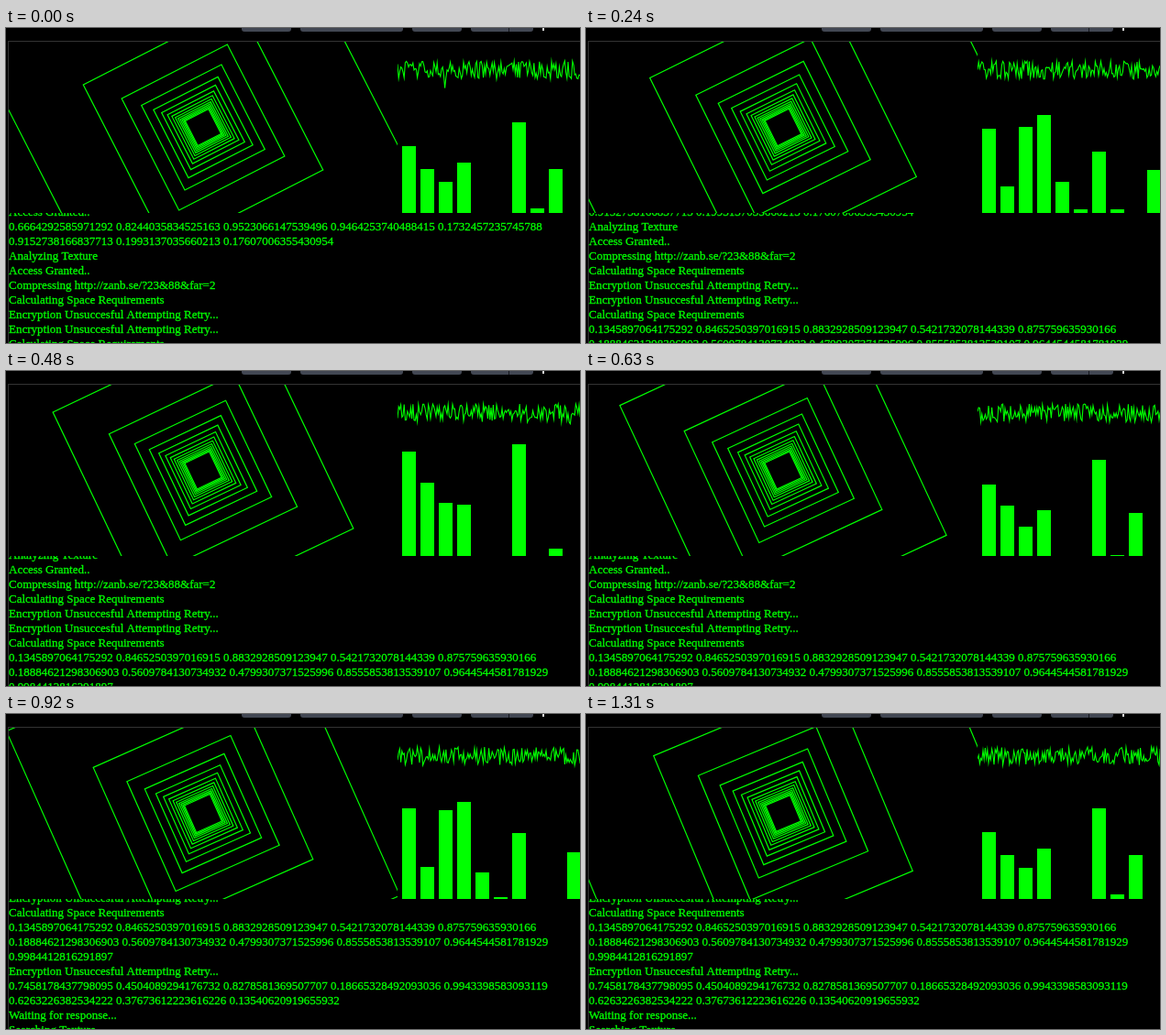
An HTML page with a canvas that plays this animation: 626 px wide and 344 px high, repeating every 1.41 s.

```html
<!DOCTYPE html>
<html lang="en">
<head>
<meta charset="utf-8">
<title>Terminal</title>
<style>
html, body { margin: 0; width: 100%; height: 100%; overflow: hidden; background: #000; }
canvas { display: block; }
</style>
</head>
<body>
<canvas id="stage" width="626" height="344"></canvas>
<script>
const ctx = document.getElementById("stage").getContext("2d");
const W = 626, H = 344, LOOP = 1410;
const GREEN = "#00ff00";

// The picture holds between these times (ms).
const STEPS = [0, 120, 240, 360, 480, 630, 800, 920, 1040, 1160, 1310];

const RETRY = "Encryption Unsuccesful Attempting Retry...";
const SPACE = "Calculating Space Requirements";
const LOG = [
  "Access Granted..",
  "0.6664292585971292 0.8244035834525163 0.9523066147539496 0.9464253740488415 0.1732457235745788",
  "0.9152738166837713 0.1993137035660213 0.17607006355430954",
  "Analyzing Texture",
  "Access Granted..",
  "Compressing http://zanb.se/?23&88&far=2",
  SPACE,
  RETRY,
  RETRY,
  SPACE,
  "0.1345897064175292 0.8465250397016915 0.8832928509123947 0.5421732078144339 0.875759635930166",
  "0.18884621298306903 0.5609784130734932 0.4799307371525996 0.8555853813539107 0.9644544581781929",
  "0.9984412816291897",
  RETRY,
  "0.7458178437798095 0.4504089294176732 0.8278581369507707 0.18665328492093036 0.9943398583093119",
  "0.6263226382534222 0.37673612223616226 0.13540620919655932",
  "Waiting for response...",
  "Searching Texture"
];

// Each bar swings as a cosine: middle height, swing, phase of its peak.
const PULSE = 655;
const BARS = [
  [93, 28, 0.62], [50, 30, 0.74], [65, 33, 0.45], [76, 31, 0.37], [-2, 38, 0.31],
  [-24, 29, 0.33], [93, 30, 0.78], [-3, 18, 0.18], [12, 36, 0], [9, 43, 0.44]
];

const clamp = (v, lo, hi) => Math.min(hi, Math.max(lo, v));

function random(seed) {
  let s = seed * 7919 + 17;
  return () => (s = (s * 16807) % 2147483647) / 2147483647;
}

function clipped(x, y, w, h, draw) {
  ctx.save();
  ctx.beginPath();
  ctx.rect(x, y, w, h);
  ctx.clip();
  draw();
  ctx.restore();
}

function drawHeader() {
  ctx.fillStyle = "#424753";
  for (const [x, w] of [[257, 54], [321, 112], [443, 54], [507, 68]]) {
    ctx.beginPath();
    ctx.roundRect(x, -8, w, 12, 3);
    ctx.fill();
  }
  ctx.fillStyle = "#15171c";
  ctx.fillRect(548, 0, 1, 4);
  ctx.fillStyle = "#ddd";
  ctx.fillRect(585, 0, 2, 3);
  ctx.fillStyle = "#333";
  ctx.fillRect(2, 14, W, 1);
  ctx.fillRect(2, 14, 1, H);
}

// Frames recede in even depth steps while the view moves in and turns.
function drawTunnel(t) {
  const near = 2.121 - 0.00093 * t;
  ctx.save();
  ctx.translate(215, 108.5);
  ctx.rotate((0.0034 * t - 27.1) * Math.PI / 180);
  ctx.lineWidth = 1.2;
  for (let z = near % 1; z < 14.2; z++) {
    const w = 202 / z, h = 214 / z;
    ctx.strokeRect(-w, -h, 2 * w, 2 * h);
  }
  ctx.restore();
}

function drawWave(step) {
  const rnd = random(step + 3);
  ctx.lineWidth = 1.1;
  ctx.beginPath();
  for (let x = 427; x <= W + 1; x += 1.2) {
    const spike = rnd() < 0.01 ? 2.2 : 1;
    ctx.lineTo(x, 46 + (rnd() - 0.5) * 20 * spike);
  }
  ctx.stroke();
}

function drawBars(t) {
  BARS.forEach(([mid, swing, peak], i) => {
    const level = mid + swing * Math.cos(2 * Math.PI * (t / PULSE - peak));
    const h = Math.max(0, Math.round(level));
    ctx.fillRect(432 + 20 * i, 202 - h, 15, h);
  });
}

function drawLog(step) {
  // Two bursts of output push the log up.
  const first = Math.min(3, step) + clamp(3 * (step - 5), 0, 5);
  ctx.font = '13px "Liberation Serif", "Times New Roman", serif';
  ctx.lineWidth = 0.3;
  LOG.slice(first, first + 10).forEach((line, i) => {
    const y = 205 + 16 * i;
    ctx.fillText(line, 3, y);
    ctx.strokeText(line, 3, y);
  });
}

function draw(time) {
  const step = STEPS.findLastIndex(s => s <= time);
  const t = STEPS[step];
  ctx.fillStyle = "#000";
  ctx.fillRect(0, 0, W, H);
  drawHeader();
  ctx.fillStyle = ctx.strokeStyle = GREEN;
  clipped(3, 15, 424, 187, () => drawTunnel(t));
  clipped(427, 15, 199, 187, () => {
    drawWave(step);
    drawBars(t);
  });
  clipped(3, 202, 623, 142, () => drawLog(step));
}

const start = performance.now();
function tick() {
  draw((performance.now() - start) % LOOP);
  requestAnimationFrame(tick);
}
tick();
</script>
</body>
</html>
```
